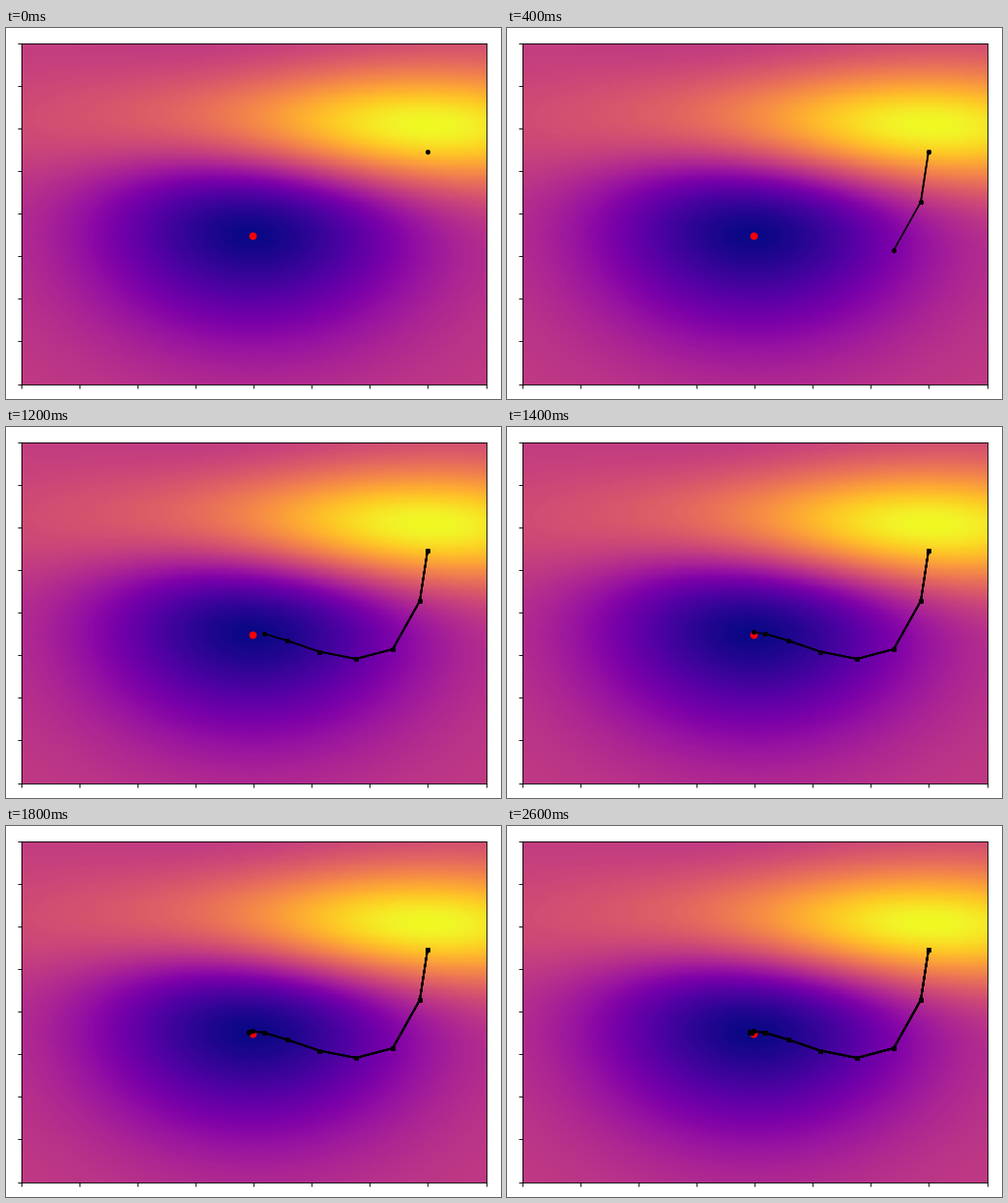
A matplotlib script that plays this animation: 512x384 px, repeating every 2.8 s.

```python
import numpy as np
import matplotlib.pyplot as plt
from matplotlib.animation import FuncAnimation

W, H, DPI = 512, 384, 80
PAD = 15.55
AX_W, AX_H = 481, 353
LIM = 2
STEPS = 14
RATE, MOMENTUM = 3, 0.25

# Gaussian bumps: sign, widths and centre
BUMPS = [(1, (1.5, 0.5), (1, 1)), (-1, (1, 1), (0, 0))]


def bump(x, y, size, centre):
    q = ((x - centre[0]) / size[0]) ** 2 + ((y - centre[1]) / size[1]) ** 2
    return np.exp(-q / 2) / (2 * np.pi * size[0] * size[1])


def surface(x, y):
    return sum(sign * bump(x, y, size, centre) for sign, size, centre in BUMPS)


def gradient(p):
    return sum(-sign * bump(*p, size, centre)
               * (p - centre) / np.square(size)
               for sign, size, centre in BUMPS)


def to_data(px, py):
    """Stage pixels to axes data coordinates."""
    return np.array([(px - PAD) / AX_W * 2 * LIM - LIM,
                     LIM - (py - PAD) / AX_H * 2 * LIM])


def descent():
    """Key points of the long sweep, then momentum steps to the minimum."""
    path = [to_data(*p) for p in [
        (436, 128), (428, 180), (400, 230), (362, 240),
        (324, 232.5), (290.5, 221), (267, 214)]]
    while len(path) < STEPS:
        velocity = path[-1] - path[-2]
        path.append(path[-1] + MOMENTUM * velocity - RATE * gradient(path[-1]))
    return np.array(path)


fig = plt.figure(figsize=(W / DPI, H / DPI), dpi=DPI, facecolor="white")
ax = fig.add_axes([PAD / W, 1 - (PAD + AX_H) / H, AX_W / W, AX_H / H])

edges = np.linspace(-LIM, LIM, 161)
mid = (edges[:-1] + edges[1:]) / 2
ax.imshow(surface(*np.meshgrid(mid, mid)), cmap="plasma", origin="lower",
          aspect="auto", interpolation="nearest",
          extent=[-LIM, LIM, -LIM, LIM])

ax.scatter(*to_data(254.5, 215.4), s=36, color="red", zorder=2)

# Each step draws the whole path again on top of the earlier ones
path = descent()
trails = [ax.plot(*path[:n + 1].T, "k.-", lw=1.5, ms=7, zorder=3)[0]
          for n in range(STEPS)]

ticks = np.linspace(-LIM, LIM, 9)
ax.set(xlim=(-LIM, LIM), ylim=(-LIM, LIM), xticks=ticks, yticks=ticks)
ax.tick_params(labelbottom=False, labelleft=False)
for spine in ax.spines.values():
    spine.set_zorder(4)


def update(step):
    for n, trail in enumerate(trails):
        trail.set_visible(n <= step)
    return trails


anim = FuncAnimation(fig, update, frames=STEPS, interval=200,
                     repeat=True, repeat_delay=0)
plt.show()
```
